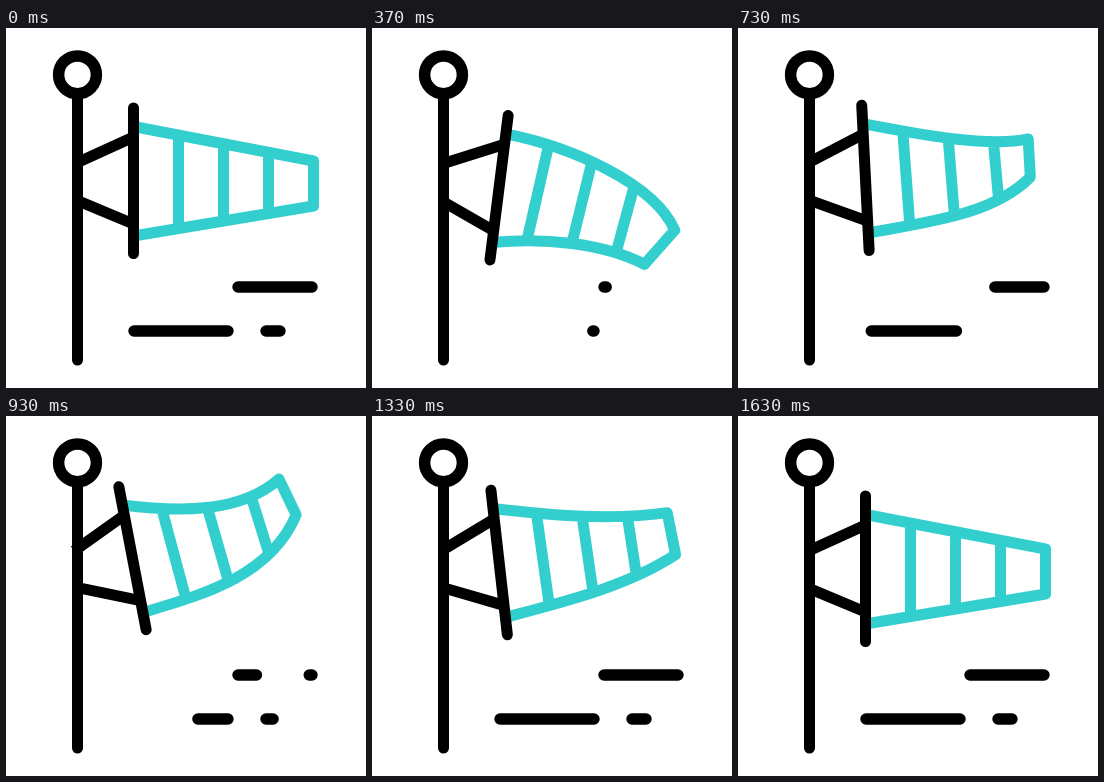
These frames come from a looping animation (360x360 px, 1670 ms). An HTML page:

```html
<!DOCTYPE html>
<html lang="en">
<head>
<meta charset="utf-8">
<title>Windsock</title>
<style>
  html, body { margin: 0; width: 100%; height: 100%; overflow: hidden; background: #fff; }
  svg { display: block; width: 100%; height: 100%; }
  path, circle { fill: none; stroke: #000; stroke-width: 11; stroke-linejoin: round; }
  .round { stroke-linecap: round; }
  #sock { stroke: #33cece; }
</style>
</head>
<body>
<svg viewBox="0 0 360 360">
  <g id="arm">
    <path id="sock" transform="translate(127.5 152.75)"/>
    <path d="M71.5 134.6L127.5 109M71.5 172.7L127.5 196"/>
    <path class="round" d="M127.5 80V225.5"/>
  </g>
  <path class="round" d="M71.5 66V332"/>
  <circle cx="71.5" cy="46.8" r="18.9" style="stroke-width:11.5"/>
  <path id="wind" class="round" style="stroke-width:11.4"/>
</svg>
<script>
const LOOP = 1670, FRAME = 100 / 3;

// Sock shapes relative to the bar centre: Bezier edges and sideways shift of the stripe ends
const topStart = [0, -54.25], bottomStart = [0, 55.25];
const rest = {
  top: [topStart, [60, -42.75], [120, -31.25], [180, -19.75]],
  bottom: [bottomStart, [60, 45.25], [120, 35.25], [180, 25.25]],
  shift: [0, 0]
};
const down = {
  top: [topStart, [66, -50], [154, -24], [180, 21.5]],
  bottom: [bottomStart, [50, 43.5], [110, 42], [153.5, 59.1]],
  shift: [-1, -11]
};
const up = {
  top: [topStart, [54, -36.5], [114, -24], [158.6, -50.7]],
  bottom: [bottomStart, [60, 49], [131.5, 44.3], [169, -12.3]],
  shift: [-7, 0]
};

// Alternating out / in spans of each gust line, in ms
const gusts = [
  { x: 232, y: 259, len: 74, spans: [[0, 350], [330, 660], [570, 985], [825, 1150]] },
  { x: 128, y: 303, len: 94, spans: [[0, 395], [390, 782], [668, 1098], [935, 1280]] },
  { x: 260, y: 303, len: 14, spans: [[0, 220], [380, 560], [500, 700], [850, 1015]] }
];

const el = id => document.getElementById(id);
const pt = p => p.map(v => v.toFixed(2)).join(' ');
const seg = (a, b) => `M${pt(a)}L${pt(b)}`;
const curve = ([a, b, c, d], join) => `${join}${pt(a)}C${[b, c, d].map(pt).join(' ')}`;

function ease(t, from, to) {
  const f = Math.min(1, Math.max(0, (t - from) / (to - from)));
  return (1 - Math.cos(Math.PI * f)) / 2;
}

// Weights of the down and up poses: rest, down, up, rest
function swing(t, downAt, upAt, restAt) {
  const rise = ease(t, downAt, upAt);
  return [ease(t, 0, downAt) - rise, rise - ease(t, upAt, restAt)];
}

// Blend numbers or nested arrays of the three poses
function blend(r, d, u, w) {
  return Array.isArray(r)
    ? r.map((v, i) => blend(v, d[i], u[i], w))
    : r + (d - r) * w[0] + (u - r) * w[1];
}

function bezier([a, b, c, d], s) {
  const q = 1 - s;
  return [0, 1].map(i =>
    a[i] * q ** 3 + 3 * b[i] * q * q * s + 3 * c[i] * q * s * s + d[i] * s ** 3);
}

function pointAtX(edge, x) {
  let lo = 0, hi = 1;
  for (let i = 0; i < 16; i++) {
    const mid = (lo + hi) / 2;
    if (bezier(edge, mid)[0] < x) lo = mid; else hi = mid;
  }
  return bezier(edge, lo);
}

function drawSock(t) {
  const [d, u] = swing(t, 400, 1050, 1635);
  el('arm').setAttribute('transform', `rotate(${7.3 * d - 12.35 * u} 71.5 152.75)`);

  // The cloth bends slightly ahead of the arm
  const w = swing(t, 310, 965, 1580);
  const [top, bottom, shift] =
    ['top', 'bottom', 'shift'].map(k => blend(rest[k], down[k], up[k], w));
  const stripes = [45, 90, 135].map(x =>
    seg(pointAtX(top, x + shift[0]), pointAtX(bottom, x + shift[1])));
  el('sock').setAttribute('d',
    curve(top, 'M') + curve([...bottom].reverse(), 'L') + stripes.join(''));
}

function drawWind(t) {
  let d = '';
  for (const { x, y, len, spans } of gusts) {
    const [out0, in1, out1, in2] = spans.map(s => ease(t, ...s));
    for (const [from, to] of [[out0, 1], [out1, in1], [0, in2]])
      if (to - from > 0.0005) d += seg([x + len * from, y], [x + len * to, y]);
  }
  el('wind').setAttribute('d', d);
}

const start = performance.now();
function tick() {
  const now = (performance.now() - start) % LOOP;
  const t = Math.floor((now + 3.4) / FRAME) % 50 * FRAME;
  drawSock(t);
  drawWind(t);
  requestAnimationFrame(tick);
}
tick();
</script>
</body>
</html>
```
